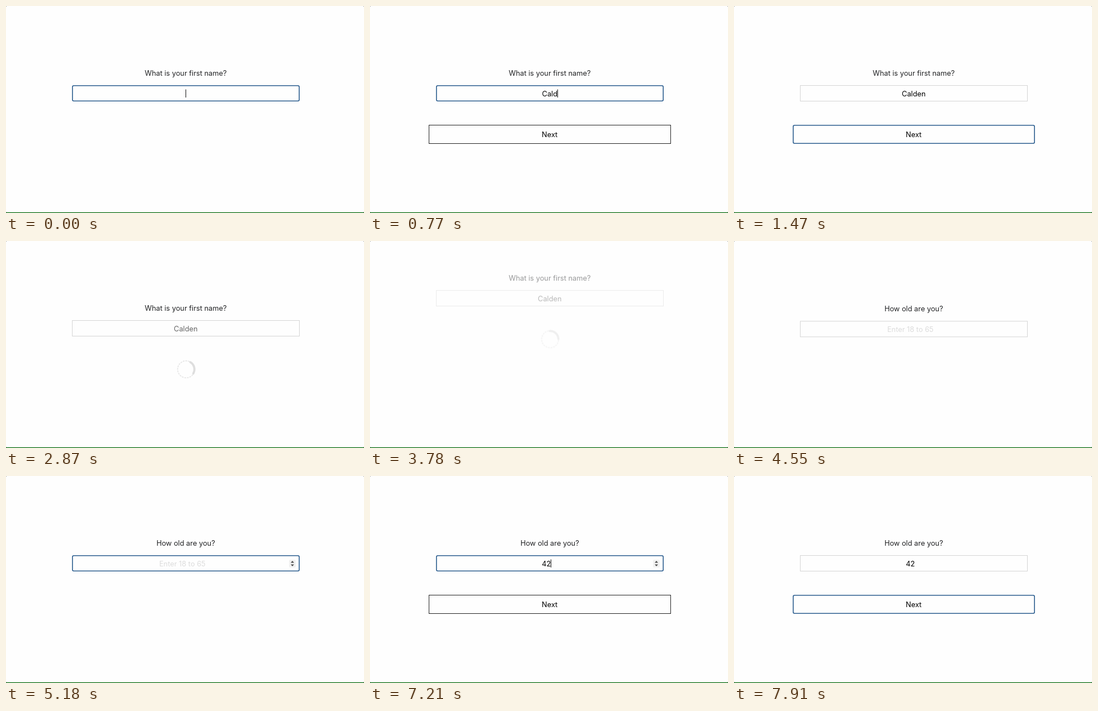
Write an HTML page that moves like this. It is 640 px wide and 371 px high and loops after 8 s.

```html
<!DOCTYPE html>
<html lang="en">
<head>
<meta charset="utf-8">
<title>Step form</title>
<style>
  html, body { margin: 0; width: 100%; height: 100%; overflow: hidden; background: #fff; }
  svg { display: block; width: 640px; height: 371px; }
  text { font: 12.8px Inter, "Liberation Sans", sans-serif; text-anchor: middle; }
  rect, path { fill: none; }
</style>
</head>
<body>
<svg viewBox="0 0 640 371">
  <rect width="640" height="371" style="fill:#fefefe"/>
  <g id="page">
    <text id="question" x="321.3" y="124.6" fill="#212224"></text>
    <rect id="field"/>
    <text id="value" y="161.6"></text>
    <rect id="caret" y="149.5" width="1" height="14.5" style="fill:#111"/>
    <g id="arrows">
      <rect x="506" y="150" width="12" height="14" rx="2" style="fill:#f1f1f1"/>
      <path d="M509 155.4l3-3.4 3 3.4zM509 158.4l3 3.4 3-3.4z" style="fill:#484848"/>
    </g>
    <g id="button">
      <rect id="frame"/>
      <text x="321.2" y="234.8">Next</text>
    </g>
    <g id="spinner" stroke="#dedede">
      <circle r="15.2" fill="none" stroke="#e9e9e9" stroke-width="2" stroke-dasharray="3.2 1.4"/>
      <path d="M10.5 -10.5A14.9 14.9 0 0 1 10.5 10.5" stroke-width="3.8" stroke-linecap="round"/>
    </g>
  </g>
  <path d="M0 369.6H640" stroke="#a9cfa9" stroke-width=".8"/>
  <path d="M0 370.5H640" stroke="#0b6a12"/>
  <path d="M0 .5H1M639 .5H640M0 369.5H1M639 369.5H640" stroke="#8b8f8b"/>
</svg>
<script>
const LOOP = 8000;
const LEAVE = 3690, ENTER = 4245, FLY = 400;
const el = {};
document.querySelectorAll('[id]').forEach(n => el[n.id] = n);

// Each step: start time and the state it changes.
const steps = [
  [0, { question: 'What is your first name?', value: '', mid: 321.3, ink: '#000',
        focus: 'field', caret: true, button: false, spinner: false, number: false }],
  [140, { caret: false }],
  [490, { value: 'C', caret: true, button: true }],
  [560, { value: 'Ca' }],
  [700, { value: 'Cal' }],
  [770, { value: 'Cald' }],
  [840, { value: 'Calde' }],
  [980, { value: 'Calden' }],
  [1470, { focus: 'button', caret: false }],
  [2030, { focus: '', ink: '#666', button: false, spinner: true }],
  [4200, { question: 'How old are you?', value: 'Enter 18 to 65', mid: 315.3,
           ink: '#dcdcdc', spinner: false }],
  [4690, { focus: 'field', number: true, caret: true }],
  [5180, { caret: false }],
  [5740, { caret: true }],
  [6230, { caret: false }],
  [6790, { caret: true }],
  [7070, { value: '4', ink: '#000' }],
  [7210, { value: '42', button: true }],
  [7770, { caret: false }],
  [7910, { focus: 'button', number: false }]
];

const set = (node, attrs) => {
  for (const k in attrs) node.setAttribute(k, attrs[k]);
};
const show = (node, on) => { node.style.display = on ? '' : 'none'; };
const clamp = x => Math.max(0, Math.min(1, x));
const easeOut = x => 1 - (1 - clamp(x)) ** 3;

function box(node, x, y, w, h, focused, plain) {
  const inset = focused ? .8 : .5;
  set(node, {
    x: x + inset, y: y + inset, width: w - 2 * inset, height: h - 2 * inset,
    rx: focused ? 2.5 : 0,
    stroke: focused ? '#2c5e8f' : plain, 'stroke-width': focused ? 1.6 : 1
  });
}

function apply(s) {
  el.question.textContent = s.question;
  el.value.textContent = s.value;
  set(el.value, { x: s.mid, fill: s.ink });
  box(el.field, 118, 142, 407, 29, s.focus === 'field', '#d5d5d5');
  box(el.frame, 105, 213, 433, 34, s.focus === 'button', '#222');
  const typed = s.ink === '#000' && s.value;
  const end = typed ? el.value.getComputedTextLength() / 2 : 0;
  set(el.caret, { x: Math.round(s.mid + end) });
  show(el.caret, s.caret);
  show(el.arrows, s.number);
  show(el.button, s.button);
  show(el.spinner, s.spinner);
}

function fly(t) {
  if (t < LEAVE) return [1, 0];
  if (t < 4200) {
    const p = easeOut((t - LEAVE) / FLY);
    return [1 - p, -100 * p];
  }
  const p = easeOut((t - ENTER) / FLY);
  return [p, 100 * (1 - p)];
}

let last = -1;
function draw(now) {
  const t = now % LOOP;
  const index = steps.filter(([at]) => at <= t).length;
  if (index !== last) {
    apply(Object.assign({}, ...steps.slice(0, index).map(s => s[1])));
    last = index;
  }
  const [opacity, y] = fly(t);
  set(el.page, { opacity, transform: `translate(0 ${y})` });
  const turn = (t - 2870) * .36 - 15;
  set(el.spinner, { transform: `translate(322 230) rotate(${turn})` });
  requestAnimationFrame(draw);
}
draw(performance.now());
</script>
</body>
</html>
```
